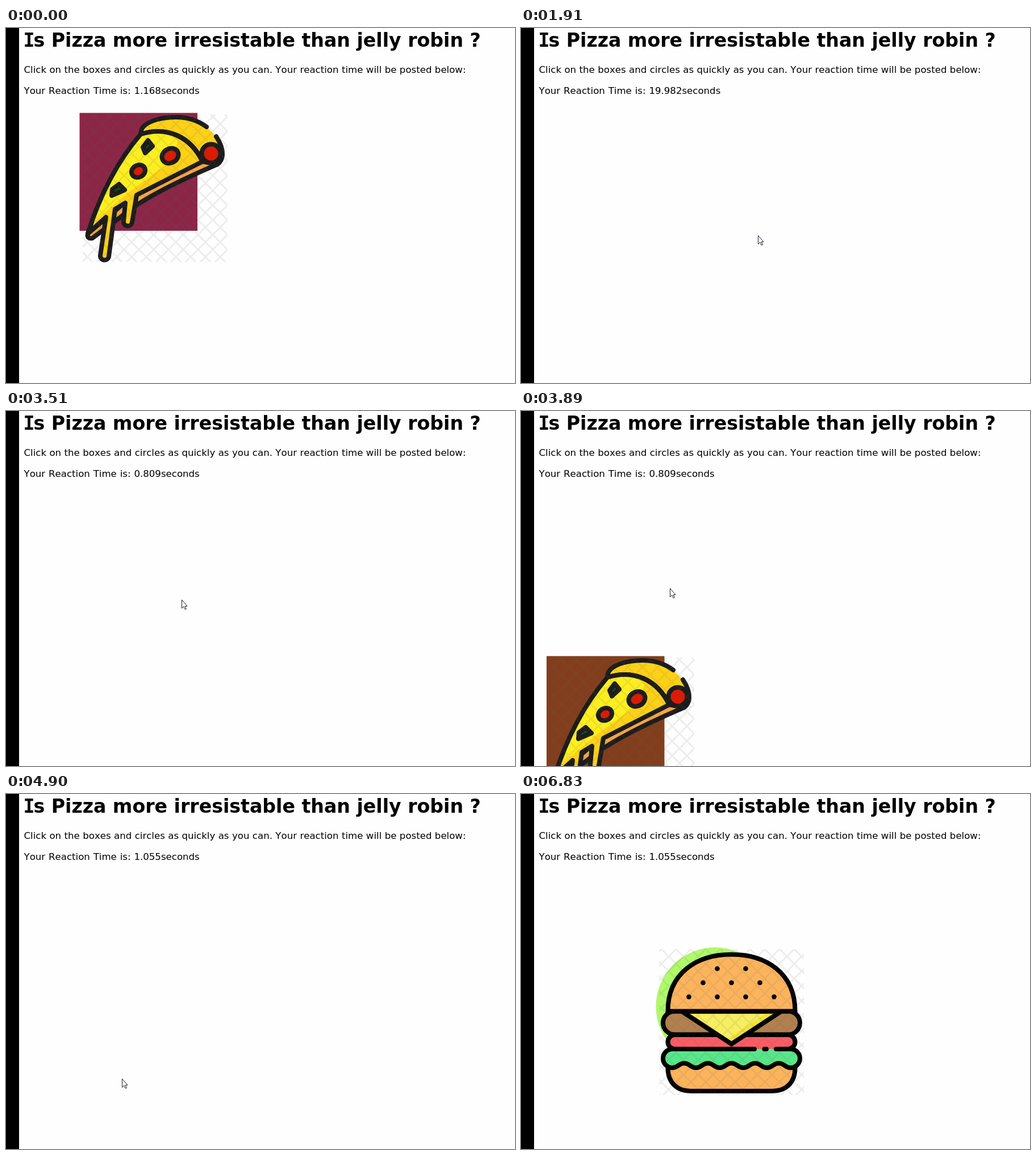
An HTML page for the animation above (7.52 s loop, 896x625 px).

```html
<!DOCTYPE html>
<html lang="en">
<head>
<meta charset="utf-8">
<title>Reaction time</title>
<style>
  html, body { margin: 0; width: 100%; height: 100%; overflow: hidden; background: #fefefe; }
  svg { display: block; width: 896px; height: 625px; }
  text { font: 16.6px "DejaVu Sans", sans-serif; word-spacing: .15px; font-kerning: none; }
  .title { font-size: 33.2px; font-weight: bold; word-spacing: -.1px; }
  .serif { font-family: "DejaVu Sans Mono", monospace; }
  #scores text { word-spacing: .6px; }
  .ink { stroke: #1c1c1c; stroke-width: 8; stroke-linecap: round; stroke-linejoin: round; }
  .burger { stroke: #000; stroke-width: 8; stroke-linecap: round; }
  .line { fill: none; }
</style>
</head>
<body>
<svg viewBox="0 0 896 625">
  <defs>
    <pattern id="hatch" width="26" height="26" patternUnits="userSpaceOnUse">
      <path d="M-2-2L28 28M28-2L-2 28" stroke="#555" stroke-opacity=".1" stroke-width="3"/>
    </pattern>
    <clipPath id="cheese">
      <path d="M241 188C196 235 165 295 144 362L230 294 346 235C325 195 290 175 241 188Z"/>
    </clipPath>
    <g id="pizza">
      <g class="ink">
        <path fill="#f9a640" d="M144 362Q142 372 152 370L228 313C270 285 330 258 372 240L346 235 230 290Z"/>
        <path fill="#fdd116" stroke="none" d="M237 185C238 166 270 157 299 157Q330 157 353 174L370 191Q382 206 381 222 380 234 372 239L346 235Z"/>
        <path class="line" d="M237 185C238 166 270 157 299 157Q330 157 353 174M370 191Q382 209 381 224 380 235 372 240"/>
        <path fill="#fdd116" d="M241 187C196 235 165 295 144 362L176 333 166 400A7.5 7.5 0 0 0 181 402L192 319 210 308 207 340A7.5 7.5 0 0 0 222 342L230 294 346 235C325 192 285 172 237 187Z"/>
        <g clip-path="url(#cheese)" stroke="none">
          <path fill="#fcee20" d="M237 182Q276 180 303 198L290 235 215 290 150 345 140 330Z"/>
        </g>
        <path class="line" d="M346 235C325 192 285 172 237 187C196 235 165 295 144 362"/>
        <circle cx="361" cy="221" r="16.5" fill="#dd1a02"/>
        <ellipse cx="289" cy="225" rx="15" ry="12.5" fill="#dd1a02" transform="rotate(-30 289 225)"/>
        <ellipse cx="233" cy="252" rx="12.5" ry="10.5" fill="#dd1a02" transform="rotate(-30 233 252)"/>
        <path fill="#174a22" d="M250 198L258 208 245 220 241 210Z"/>
        <path fill="#174a22" d="M199 275L209 285 186 295 187 284Z"/>
      </g>
      <rect x="135" y="152" width="255" height="260" fill="url(#hatch)"/>
    </g>
  </defs>

  <rect width="23" height="625"/>
  <text class="title" x="31.5" y="33"><tspan class="serif" dx="-1">I</tspan><tspan dx="-2">s Pizza more irresistable than jelly robin ?</tspan></text>
  <text x="31.5" y="79">Click on the boxes and circles as quickly as you can. Your reaction time will be posted below:</text>
  <g id="scores"></g>

  <g id="round1">
    <rect x="129.5" y="149.5" width="207.5" height="207.5" fill="#8b2647"/>
    <use href="#pizza"/>
  </g>
  <g id="round2">
    <circle cx="509" cy="324" r="104" fill="#c86c4b"/>
    <use href="#pizza" x="275.5" y="71"/>
  </g>
  <g id="round3">
    <rect x="45" y="431.5" width="207.5" height="207.5" fill="#823e1c"/>
    <use href="#pizza" x="-85" y="282"/>
  </g>
  <g id="round4">
    <circle cx="341.5" cy="374" r="104" fill="#b0f86c"/>
    <g class="burger">
      <path fill="#fcb45c" d="M258.5 472v10c0 28 18 41 40 41h144c22 0 40-13 40-41v-10"/>
      <path id="lettuce" fill="#58e689"/>
      <rect x="258.5" y="424" width="224" height="25" rx="12.5" fill="#fb5c64" stroke="none"/>
      <path class="line" d="M411 449H271a12.5 12.5 0 0 1 0-25H470a12.5 12.5 0 0 1 0 25H449M428.5 449H432"/>
      <rect x="250" y="382.5" width="241" height="41" rx="20.5" fill="#b2804e"/>
      <path fill="#f7ee62" d="M283 382.5H458L370.5 440Z"/>
      <path fill="#f2e338" stroke="none" d="M432 386H446L373 434 365 430Z"/>
      <path class="line" d="M283 382.5H458L370.5 440Z"/>
      <path fill="#fcb45c" d="M258.5 382.5C258.5 315 310 282.5 370.5 282.5S482.5 315 482.5 382.5Z"/>
    </g>
    <g id="seeds"></g>
    <rect x="243" y="273" width="255" height="257" fill="url(#hatch)"/>
  </g>

  <g id="cursor">
    <circle id="ring" cx="1" r="13" fill="#ff0" fill-opacity=".55"/>
    <path d="M.5 .5V15.3L4 12.2 6.3 17.4 8.4 16.5 6.2 11.5H10Z" fill="#fff" stroke="#1c1c30"/>
  </g>
</svg>
<script>
const LOOP = 7520;
const el = id => document.getElementById(id);

function add(parent, tag, attrs, content = "") {
  const node = document.createElementNS("http://www.w3.org/2000/svg", tag);
  for (const key in attrs) node.setAttribute(key, attrs[key]);
  node.textContent = content;
  el(parent).append(node);
  return node;
}

// steps: [time, styles]; each one holds until the next
function play(node, steps) {
  const frames = steps.map(([time, styles]) => ({ ...styles, offset: time / LOOP, easing: "step-end" }));
  frames.push({ ...steps.at(-1)[1], offset: 1 });
  node.animate(frames, { duration: LOOP, iterations: Infinity });
}

// spans: [from, to] pairs in which the node is visible
function show(node, ...spans) {
  const steps = spans.flatMap(([from, to]) => [[from, { opacity: 1 }], [to, { opacity: 0 }]]);
  if (spans[0][0] > 0) steps.unshift([0, { opacity: 0 }]);
  if (steps.at(-1)[0] >= LOOP) steps.pop();
  play(node, steps);
}

// Burger details
const wave = "c10.4 0 10.4-8 20.8-8s10.4 8 20.8 8";
el("lettuce").setAttribute("d", `M266.5 449a16.5 16.5 0 0 0 0 33${wave.repeat(5)}a16.5 16.5 0 0 0 0-33`);
[2, 3, 4].forEach((count, row) => {
  for (let i = 0; i < count; i++)
    add("seeds", "circle", { cx: 370.5 + (i - (count - 1) / 2) * 50, cy: 307.5 + row * 24.8, r: 4.3 });
});

// Rounds and scores
const clicks = [1130, 2750, 4900];
show(el("round1"), [0, clicks[0]]);
show(el("round2"), [1990, clicks[1]]);
show(el("round3"), [3890, clicks[2]]);
show(el("round4"), [6830, LOOP]);

["1.168", "19.982", "0.809", "1.055"].forEach((score, i) => {
  const line = add("scores", "text", { x: 31.5, y: 115.5 }, `Your Reaction Time is: ${score}seconds`);
  show(line, [clicks[i - 1] ?? 0, clicks[i] ?? LOOP]);
});

// Pointer: first and last step time, step count, then start, bend and end points
const moves = [
  [210, 750, 8, [688, 546], [480, 436], [271, 326]],
  [1450, 2130, 10, [271, 326], [352, 417], [443, 348]],
  [2360, 2440, 2, [443, 348], [452, 348], [461, 348]],
  [3130, 3810, 10, [461, 348], [364, 363], [262, 312]],
  [4270, 4500, 4, [262, 312], [233, 406], [204, 501]],
  [5210, 5670, 7, [204, 501], [500, 370], [930, 600]]
];
const path = moves.flatMap(([first, last, count, a, b, c]) =>
  Array.from({ length: count }, (_, i) => {
    const s = 1 - (1 - (i + 1) / count) ** 1.6;
    const [x, y] = [0, 1].map(k =>
      Math.round((1 - s) ** 2 * a[k] + 2 * s * (1 - s) * b[k] + s * s * c[k]));
    return [first + (last - first) * i / (count - 1), { transform: `translate(${x}px, ${y}px)` }];
  }));
play(el("cursor"), [[0, { transform: "translate(688px, 546px)" }], ...path]);
show(el("cursor"), [210, 5670]);
show(el("ring"), [980, 1060], [2670, 2750], [4820, 4900]);
</script>
</body>
</html>
```
